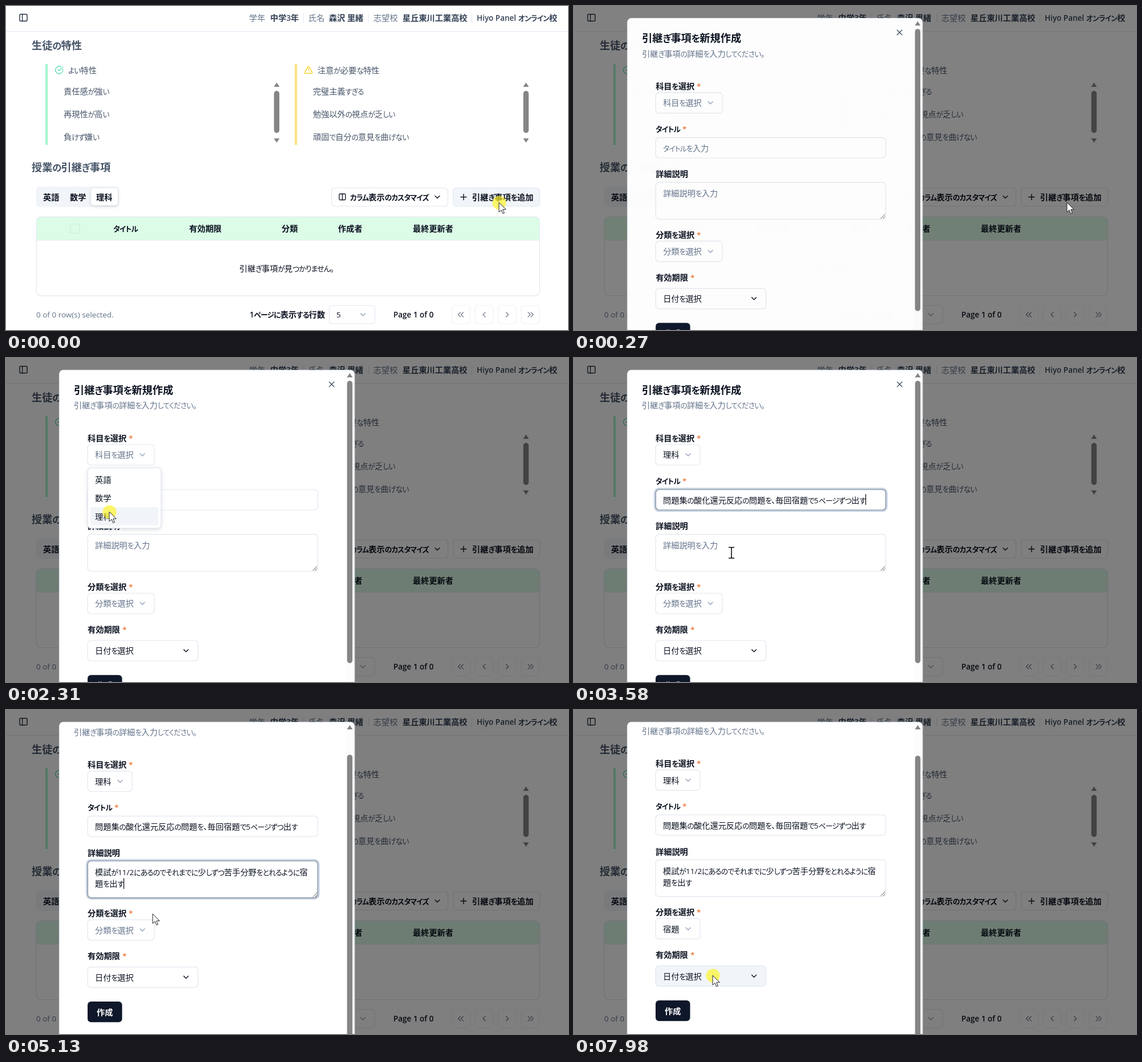
An HTML page that plays this animation: 985 by 569 pixels, repeating every 8 s.

```html
<!DOCTYPE html>
<html lang="ja">
<head>
<meta charset="utf-8">
<title>引継ぎ事項</title>
<style>
  html, body { margin: 0; width: 100%; height: 100%; overflow: hidden; background: #fff; }
  svg { display: block; width: 100%; height: 100%; }
  text { font-family: "Noto Sans CJK JP", "Noto Sans CJK", sans-serif; font-feature-settings: "palt"; }
  .kana { font-size: .9em; letter-spacing: -.065em; }
  .latin { font-family: "Open Sans", "Noto Sans", sans-serif; font-size: .95em; }
  .raised { filter: drop-shadow(0 2px 3px rgba(15, 23, 42, .14)); }
</style>
</head>
<body>
<svg id="stage" viewBox="0 0 985 569" fill="none"></svg>
<script>
const LOOP = 8000;
const INK = '#0b1220', SLATE = '#475569', MUTED = '#64748b', FAINT = '#94a3b8';
const LINE = '#e2e8f0', HOVER = '#f1f5f9', THUMB = '#858585';

// Markup helpers. For text, y is the vertical middle of the glyphs.
const text = (x, y, s, { size = 14.2, weight = 400, fill = INK } = {}) => {
  const runs = s.replace(/[ぁ-ヿ]+|[ -~]+/g, run =>
    `<tspan class="${/[ -~]/.test(run) ? 'latin' : 'kana'}">${run}</tspan>`);
  return `<text x="${x}" y="${y + size * .38}" font-size="${size}" font-weight="${weight}" fill="${fill}">${runs}</text>`;
};
const bold = (x, y, s, fill = INK) => text(x, y, s, { weight: 600, fill });
const box = (x, y, w, h, { r = 6, fill = '#fff', stroke = LINE, width = 1.2, attrs = '' } = {}) =>
  `<rect x="${x}" y="${y}" width="${w}" height="${h}" rx="${r}" fill="${fill}" stroke="${stroke}" stroke-width="${width}" ${attrs}/>`;
const line = (d, stroke = INK, width = 1.3, attrs = '') =>
  `<path d="${d}" stroke="${stroke}" stroke-width="${width}" stroke-linecap="round" stroke-linejoin="round" ${attrs}/>`;
const chevron = (x, y, color = INK, turn = 0) =>
  line('M-4-2L0 2L4-2', color, 1.4, `transform="translate(${x} ${y}) rotate(${turn})"`);
const icon = (x, y, d, color) => line(d, color, 2, `transform="translate(${x} ${y}) scale(.66)"`);
const group = (id, content) => `<g id="${id}">${content}</g>`;
const triangle = (x, y, dir) => `<path d="M${x - 5} ${y + 3.5 * dir}h10L${x} ${y - 4 * dir}z" fill="${THUMB}"/>`;
const thumb = (x, y, h) =>
  `<rect x="${x - 4.7}" y="${y}" width="9.4" height="${h}" rx="4.7" fill="${THUMB}"/>`;

function traits(x, barColor, title, iconMarkup, items) {
  const bar = x + 405.4;
  return `<rect x="${x}" y="102" width="4.3" height="142" fill="${barColor}"/>` + iconMarkup
    + text(x + 40, 113, title, { weight: 500, fill: SLATE })
    + items.map((s, i) => text(x + 32, 149.5 + i * 40.3, s, { fill: SLATE })).join('')
    + triangle(bar, 138.5, 1) + thumb(bar, 149, 74) + triangle(bar, 236, -1);
}

function pageMarkup() {
  const header = box(24, 14.5, 13, 12, { r: 2, stroke: '#1e293b', width: 1.4 }) + line('M28.6 14.5v12', '#1e293b')
    + [['学年', 426], ['氏名', 530], ['志望校', 644]].map(([s, x]) => text(x, 21, s, { fill: MUTED })).join('')
    + [['中学3年', 463], ['森沢 里緒', 566], ['星丘東川工業高校', 695], ['Hiyo Panel オンライン校', 825]]
      .map(([s, x]) => bold(x, 21, s, '#334155')).join('')
    + [521.5, 635.5, 816.5].map(x => line(`M${x} 13v16`, LINE, 1)).join('')
    + line('M0 44.5H985', LINE, 1);

  const heading = (y, s) => text(45, y, s, { size: 18.2, weight: 600, fill: SLATE });
  const profile = heading(69, '生徒の特性')
    + traits(69, '#a7f3d0', 'よい特性',
      icon(85.2, 104.5, 'M21.8 10A10 10 0 1 1 17 3.3M9 11l3 3L22 4', '#5fe0b0'),
      ['責任感が強い', '再現性が高い', '負けず嫌い'])
    + traits(506, '#fde283', '注意が必要な特性',
      icon(522.3, 104.5, 'M21.7 18l-8-14a2 2 0 0 0-3.5 0l-8 14A2 2 0 0 0 4 21h16a2 2 0 0 0 1.7-3M12 9v4M12 17h.01', '#facc15'),
      ['完璧主義すぎる', '勉強以外の視点が乏しい', '頑固で自分の意見を曲げない']);

  const toolbar = heading(283.5, '授業の引継ぎ事項')
    + box(53, 317, 145, 36, { fill: HOVER, stroke: 'none' })
    + box(149, 320, 47, 30, { r: 5, stroke: 'none', attrs: 'class="raised"' })
    + bold(65, 335.5, '英語') + bold(112, 335.5, '数学') + bold(158, 335.5, '理科')
    + box(570.5, 319.5, 204, 32)
    + box(584, 330, 11, 10.5, { r: 1.5, stroke: INK, width: 1.3 }) + line('M589.5 330v10.5')
    + bold(603, 335.5, 'カラム表示のカスタマイズ') + chevron(756, 335.5)
    + box(783.5, 319.5, 152, 32, { attrs: 'id="addButton"' })
    + line('M797 335.5h10M802 330.5v10', INK, 1.4) + bold(817, 335.5, '引継ぎ事項を追加');

  const table = '<path d="M53 411V378a8 8 0 0 1 8-8H927a8 8 0 0 1 8 8V411z" fill="#dcfce7"/>'
    + line('M53 411.2H935', LINE, 1)
    + box(53.2, 370.3, 882, 138.5, { r: 8, fill: 'none' })
    + box(113, 383, 16, 16, { r: 3, fill: 'none', stroke: '#cfeedb' })
    + [['タイトル', 188], ['有効期限', 321], ['分類', 483], ['作成者', 582], ['最終更新者', 713]]
      .map(([s, x]) => bold(x, 391, s)).join('')
    + text(409, 460.5, '引継ぎ事項が見つかりません。');

  const pagers = [[797.5, [[-3, 90], [2, 90]]], [838, [[0, 90]]], [878.5, [[0, -90]]], [919, [[-2, -90], [3, -90]]]]
    .map(([x, arrows]) => box(x - 16, 526, 32, 32, { stroke: '#edf1f6' })
      + arrows.map(([dx, turn]) => chevron(x + dx, 542, '#7c8494', turn)).join('')).join('');
  const footer = text(53, 542, '0 of 0 row(s) selected.', { fill: MUTED })
    + bold(427, 542, '1ページに表示する行数')
    + box(566.5, 526, 80, 32) + text(579, 542, '5') + chevron(625.5, 542, FAINT)
    + bold(679, 542, 'Page 1 of 0') + pagers;

  return header + profile + toolbar + table + footer;
}

const label = (y, s, starX) => bold(143, y, s) + (starX ? text(starX, y, '*', { fill: '#ea580c' }) : '');
const focusRing = (y, h) => box(141.5, y - 1.5, 406.5, h + 3, { r: 7.5, fill: 'none', stroke: '#cbd5e1', width: 3.4 })
  + box(143.3, y, 403, h, { fill: 'none', stroke: '#7888a0' });
const caret = (x, y) => line(`M${x} ${y - 9}v18`, '#000', 1.2);

function select(id, y, placeholder, choice) {
  return group(id + 'Empty', box(143, y, 117, 36) + text(156, y + 18, placeholder, { fill: MUTED }) + chevron(239, y + 18, FAINT))
    + group(id + 'Chosen', box(143, y, 78, 36) + text(156, y + 18, choice) + chevron(200, y + 18, FAINT));
}
function menu(id, y, items) {
  return group(id, box(143.3, y, 128.5, 106, { attrs: 'class="raised"' })
    + `<rect id="${id}Hover" x="148" y="${y + 4.5}" width="119" height="32" rx="4" fill="${HOVER}"/>`
    + items.map((s, i) => text(156, y + 21 + i * 32.3, s)).join(''));
}

function modalMarkup() {
  const form = text(119, 56, '引継ぎ事項を新規作成', { size: 18.2, weight: 600 })
    + text(119, 83, '引継ぎ事項の詳細を入力してください。', { fill: MUTED })
    + line('M566.5 42l8.5 8.5M575 42l-8.5 8.5', SLATE, 1.4)
    + label(140.5, '科目を選択', 215) + select('subject', 152, '科目を選択', '理科')
    + label(215.5, 'タイトル', 190) + box(143, 231, 403.5, 36)
    + group('titleFocus', focusRing(231, 36))
    + group('titleEmpty', text(156, 249.5, 'タイトルを入力', { fill: MUTED }))
    + group('titleFilled', text(156, 249.5, '問題集の酸化還元反応の問題を、毎回宿題で5ページずつ出す'))
    + group('titleCaret', caret(511.3, 248.5))
    + label(295, '詳細説明') + box(143, 309.7, 403.5, 64.8)
    + group('detailFocus', focusRing(309.7, 64.8) + caret(206.5, 349.5))
    + group('detailEmpty', text(156, 329, '詳細説明を入力', { fill: MUTED }))
    + group('detailFilled', text(156, 329.5, '模試が11/2にあるのでそれまでに少しずつ苦手分野をとれるように宿') + text(156, 349.5, '題を出す'))
    + line('M538 373l7-7M542 373l3-3', '#555', 1)
    + label(401.5, '分類を選択', 215) + select('category', 413, '分類を選択', '宿題')
    + label(476.5, '有効期限', 204) + box(143, 496, 193.5, 36, { attrs: 'id="dateButton"' })
    + text(156, 514, '日付を選択') + chevron(315.5, 514)
    + box(143, 556.7, 60.5, 36.3, { fill: '#0f172a', stroke: 'none' }) + bold(159, 575, '作成', '#fff')
    + menu('subjectMenu', 192.8, ['英語', '数学', '理科'])
    + menu('categoryMenu', 453.8, ['宿題', '授業', 'その他']);
  return box(93.5, 21.3, 517.3, 600, { r: 7 })
    + `<g clip-path="url(#modalClip)">${group('form', form)}`
    + '<rect x="595" y="22" width="15" height="560" fill="#fcfcfc"/>'
    + triangle(602.5, 30.5, 1) + group('modalThumb', thumb(602.5, 40, 496)) + '</g>';
}

const arrow = '<path d="M0 0V17L4 13.3L6.8 19.6L9.4 18.5L6.7 12.3H12.2Z" fill="#fff" stroke="#222" stroke-width="1" stroke-linejoin="round"/>';
const beam = line('M-4.5-9.5H-1.5Q0-9.5 0-8V8Q0 9.5-1.5 9.5H-4.5M4.5-9.5H1.5Q0-9.5 0-8M0 8Q0 9.5 1.5 9.5H4.5', '#000', 1.5);

document.getElementById('stage').innerHTML =
  '<clipPath id="modalClip"><rect x="94" y="22" width="516.5" height="600" rx="6.5"/></clipPath>'
  + pageMarkup()
  + '<rect id="overlay" width="985" height="569" fill="#000"/>'
  + group('modal', modalMarkup())
  + group('spot', '<circle cx="0.5" cy="0.5" r="12" fill="#fff21a" opacity=".65"/>')
  + group('pointer', group('arrow', arrow) + group('beam', beam));

const $ = id => document.getElementById(id);
const show = (id, visible) => { $(id).style.display = visible ? '' : 'none'; };
const clamp = (v, lo = 0, hi = 1) => Math.min(hi, Math.max(lo, v));
const easeOut = u => 1 - (1 - clamp(u)) ** 3;
const between = (t, from, to) => t >= from && t < to;

// Pointer stops: time, x, y.
const route = [
  [480, 864, 345], [1020, 178, 181], [1420, 178, 181], [2040, 181, 262], [2110, 181, 262], [2240, 181, 270],
  [2440, 181, 270], [2850, 235, 252], [3050, 235, 252], [3380, 276, 342], [4640, 276, 342],
  [5130, 257, 358], [5400, 230, 382], [6150, 230, 382], [6510, 210, 435], [7310, 210, 435], [7720, 243, 466]
];
const clicks = [[0, 190], [1290, 1420], [2240, 2440], [2980, 3050], [4110, 4240], [5470, 5650], [6840, 6980], [7980, LOOP]];

function pointerAt(t) {
  const next = route.findIndex(([time]) => time > t);
  if (next <= 0) return (next ? route.at(-1) : route[0]).slice(1);
  const [t0, x0, y0] = route[next - 1], [t1, x1, y1] = route[next];
  const u = (t - t0) / (t1 - t0), k = u * u * (3 - 2 * u);
  return [x0 + (x1 - x0) * k, y0 + (y1 - y0) * k];
}

function updateMenu(id, t, opens, closes, top, pointerY) {
  show(id, between(t, opens, closes));
  $(id).setAttribute('opacity', clamp(.4 + (t - opens) / 120));
  const row = clamp(Math.floor((pointerY - top) / 32.3), 0, 2);
  $(id + 'Hover').setAttribute('transform', `translate(0 ${row * 32.3})`);
}

function draw(t) {
  const [x, y] = pointerAt(t);
  const at = `translate(${x} ${y})`;
  $('pointer').setAttribute('transform', at);
  $('spot').setAttribute('transform', at);
  show('spot', clicks.some(([from, to]) => between(t, from, to)));
  const overText = between(t, 2750, 4800);
  show('beam', overText);
  show('arrow', !overText);

  const opened = t < 130 ? 0 : easeOut((t - 90) / 240);
  const scale = .95 + .05 * opened;
  $('overlay').setAttribute('opacity', opened * .5);
  $('modal').setAttribute('opacity', opened);
  $('modal').setAttribute('transform', `translate(352 300) scale(${scale}) translate(-352 -300)`);
  $('addButton').setAttribute('fill', t < 130 ? HOVER : '#fff');

  const scroll = 46.8 * easeOut((t - 4640) / 760);
  $('form').setAttribute('transform', `translate(0 ${-scroll})`);
  $('modalThumb').setAttribute('transform', `translate(0 ${scroll * .86})`);

  updateMenu('subjectMenu', t, 1290, 2440, 197, y);
  updateMenu('categoryMenu', t, 5470, 6910, 411, y);
  for (const [field, since] of [['subject', 2440], ['category', 6910]]) {
    show(field + 'Empty', t < since);
    show(field + 'Chosen', t >= since);
  }
  for (const [field, since, until] of [['title', 2980, 4110], ['detail', 4110, 5470]]) {
    show(field + 'Empty', t < since);
    show(field + 'Filled', t >= since);
    show(field + 'Focus', between(t, since, until));
  }
  show('titleCaret', between(t, 2980, 3380) || between(t, 3580, 4110));
  $('dateButton').setAttribute('fill', t >= 7500 ? HOVER : '#fff');
}

function tick() {
  draw(performance.now() % LOOP);
  requestAnimationFrame(tick);
}
tick();
</script>
</body>
</html>
```
